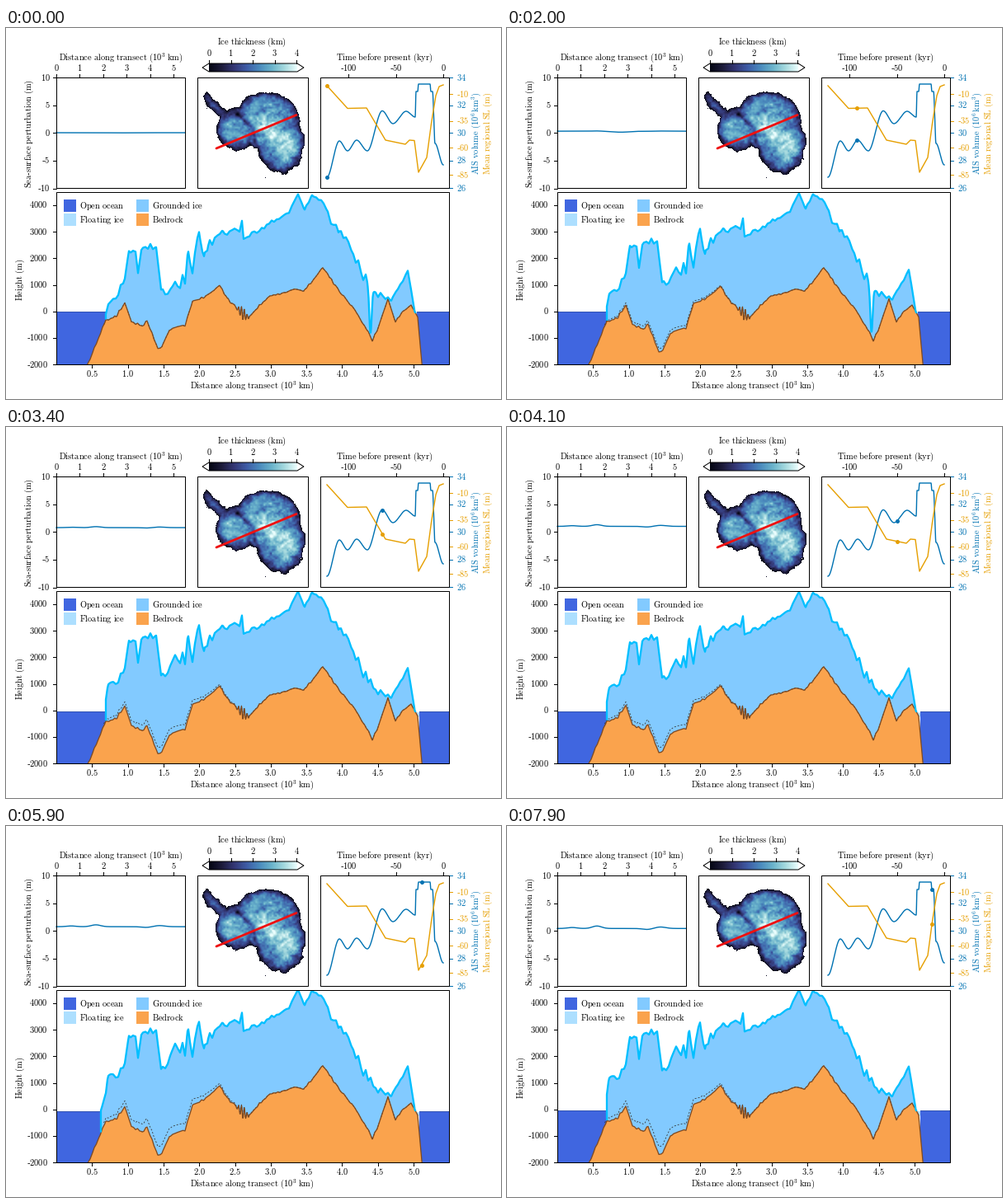
These frames come from a looping animation (600x450 px, 8 s). A matplotlib script:

```python
import numpy as np
import matplotlib.pyplot as plt
from matplotlib.animation import FuncAnimation
from matplotlib.colors import LinearSegmentedColormap
from matplotlib.patches import Rectangle

plt.rcParams.update({"mathtext.fontset": "cm", "font.family": "Liberation Serif"})

FRAMES, INTERVAL = 80, 100
PX = 0.72  # points per pixel
BLUE, ORANGE, INK = "#0072b2", "#e69f00", "black"
OCEAN, FLOATING, GROUNDED, ROCK = "#4066e0", "#addfff", "#82caff", "#faa34d"
ICE_EDGE, ROCK_EDGE = "#00bfff", "#7d4a22"
rng = np.random.default_rng(4)

# All coordinates are stage pixels, y pointing down.
fig = plt.figure(figsize=(6, 4.5), dpi=100, facecolor="white")
ax = fig.add_axes([0, 0, 1, 1])
ax.axis("off")


# ---------- helpers ----------
def tex(s):
    parts = [p.replace(" ", r"\ ") for p in s.split("-")]
    return "-".join(rf"$\mathrm{{{p}}}$" if p else "" for p in parts)


def label(x, y, s, ha="center", color=INK, rotation=0):
    va = "center" if rotation else "baseline"
    ax.text(x, y, tex(s), ha=ha, va=va, color=color, rotation=rotation,
            fontsize=7.5, zorder=9)


def line(x, y, color=INK, width=1.0, **kw):
    kw.setdefault("zorder", 6)
    return ax.plot(x, y, color=color, lw=width * PX, **kw)[0]


def frame(x0, y0, x1, y1):
    ax.add_patch(Rectangle((x0, y0), x1 - x0, y1 - y0, fill=False,
                           ec=INK, lw=PX, zorder=8))


def x_ticks(y, values, pos, up=True, fmt="{}"):
    for v in values:
        x = pos(v)
        line([x, x], [y, y - 4 if up else y + 4])
        label(x, y - 8.5 if up else y + 15, fmt.format(v))


def y_ticks(x, values, pos, gap, left=True, color=INK):
    side = -1 if left else 1
    for v in values:
        y = pos(v)
        line([x, x + 4 * side], [y, y], color)
        label(x + gap * side, y + 3.5, str(v), "right" if left else "left", color)


def bell(x, center, width):
    return np.exp(-((x - center) / width) ** 2)


def through(points, x):
    return np.interp(x, *np.transpose(points))


def ease_through(points, x):
    """Eased steps from one turning point to the next."""
    px, py = np.transpose(points)
    k = np.interp(x, px, np.arange(len(px)))
    u = k % 1
    return np.interp(k - u + u * u * (3 - 2 * u), np.arange(len(py)), py)


def jitter(x, step):
    knots = np.arange(x[0], x[-1] + step, step)
    return np.interp(x, knots, rng.normal(0, 1, len(knots)))


# ---------- axes ----------
time_x = lambda t: 530 + 1.15 * t
sl_y = lambda m: 67 - 1.307 * m
height_y = lambda h: 343.7 - 0.0322 * h

frame(61, 60, 217, 194)
x_ticks(60, range(6), lambda v: 61 + 28.45 * v)
y_ticks(61, range(-10, 11, 5), lambda v: 127.3 - 6.72 * v, 7.5)
label(139, 39, "Distance along transect (10^3 km)")
label(28, 128, "Sea-surface perturbation (m)", rotation=90)

frame(232, 60, 366, 194)

frame(381, 60, 537, 194)
x_ticks(60, (-100, -50, 0), time_x)
y_ticks(537, range(26, 35, 2), lambda v: 194.4 - 16.8 * (v - 26), 9, False, BLUE)
y_ticks(537, (-10, -35, -60, -85), sl_y, 9, False, ORANGE)
label(459, 39, "Time before present (kyr)")
label(570, 128, r"AIS volume (10^6\,km^3)", color=BLUE, rotation=90)
label(584, 128, "Mean regional SL (m)", color=ORANGE, rotation=90)

frame(61, 199, 537, 408)
x_ticks(408, np.arange(0.5, 5.1, 0.5), lambda v: 61 + 86.6 * v, False, "{:.1f}")
y_ticks(61, range(-2000, 4001, 1000), height_y, 10.5)
label(298, 437, "Distance along transect (10^3 km)")
label(17, 305, "Height (m)", rotation=90)

for x, y, color, name in ((70, 208, OCEAN, "Open ocean"),
                          (70, 225, FLOATING, "Floating ice"),
                          (158, 208, GROUNDED, "Grounded ice"),
                          (158, 225, ROCK, "Bedrock")):
    ax.add_patch(Rectangle((x, y), 15, 15, fc=color, ec="none", zorder=7))
    label(x + 19, y + 11, name, "left")

# ---------- colour bar ----------
ICE_MAP = LinearSegmentedColormap.from_list("ice", [
    "#040613", "#1c1b3a", "#343775", "#3e5ca6", "#4a8abd",
    "#6ab3cb", "#a5d9de", "#eafdfd"])
ax.imshow(np.linspace(0, 1, 214)[None], cmap=ICE_MAP, aspect="auto",
          extent=(246, 353, 53, 43), zorder=5)
ax.fill([246, 353, 361, 353, 246, 238], [43, 43, 48, 53, 53, 48],
        fill=False, ec=INK, lw=PX, zorder=6)
x_ticks(43, range(5), lambda v: 246 + 26.6 * v)
label(298, 20, "Ice thickness (km)")

# ---------- time series ----------
VOLUME = [(389, 181), (404, 137), (414, 149), (425, 136), (438, 149), (456, 100.5),
          (469, 116), (485, 101), (496, 108), (497, 77), (499, 77), (500, 68),
          (514, 68), (515, 77), (517, 77), (520, 140), (530, 166)]
SEA_LEVEL = [(389, 70), (414, 97.5), (437, 97), (460, 136), (484, 141), (489, 136),
             (495, 136.5), (500, 175), (510, 157), (515, 119), (521, 82), (525, 71),
             (530, 69)]
years = np.arange(389, 530.1, 0.25)
line(years, ease_through(VOLUME, years), BLUE, 1.4)
line(years, through(SEA_LEVEL, years), ORANGE, 1.4)
dot_style = dict(marker="o", ms=5 * PX, mew=0, zorder=7)
vol_dot = line([0], [0], BLUE, **dot_style)
sl_dot = line([0], [0], ORANGE, **dot_style)

# ---------- sea-surface perturbation ----------
wave_x = np.arange(61, 218)
wave = line(wave_x, wave_x * 0, BLUE, 1.4)
ripple = (bell(wave_x, 109, 8) + 0.6 * bell(wave_x, 186, 9)
          - 0.4 * bell(wave_x, 170, 8) + 0.4 * bell(wave_x, 79, 8))
trough = bell(wave_x, 138, 15)


def wave_y(i):
    level = through([(0, 0.3), (13, 0.6), (27, 3.7), (41, 6.8), (52, 4.6),
                     (68, 5.9), (79, 3)], i)
    swing = through([(0, 0), (27, 0.4), (41, 2), (52, 1.2), (68, 3.6), (79, 3)], i)
    sag = 2.6 * bell(i, 13, 8)
    return 127.3 - level - swing * ripple + sag * trough


# ---------- transect ----------
BED = [(97, 412), (110, 382), (121, 354), (133, 350), (144, 334), (152, 356),
       (165, 362), (171, 356), (184, 388), (189, 387), (198, 366), (217, 360),
       (226, 332), (241, 326), (259, 312), (268, 328), (294, 353), (304, 339),
       (320, 326), (352, 316), (361, 319), (372, 306), (384, 290), (396, 308),
       (424, 343), (444, 379), (450, 366), (463, 329), (472, 356), (481, 344),
       (491, 336), (499, 351), (504.5, 412)]
ICE = [(115, 345), (121, 345), (124, 333), (136, 322), (144, 303), (149, 270),
       (154, 270), (160, 292), (164, 267), (182, 267), (188, 321), (217, 305),
       (221, 278), (226, 296), (234, 249), (240, 277), (245, 262), (263, 244),
       (283, 247), (286, 234), (288, 256), (307, 245), (343, 223), (354, 201),
       (362, 219), (371, 203), (382, 208), (390, 222), (394, 238), (404, 242),
       (434, 300), (446, 318), (467, 331), (487, 293), (496, 348)]

xs = np.arange(97, 505, 0.5)
crevasses = 8 * np.sin(1.8 * xs) * bell(xs, 287, 5)
bed0 = through(BED, xs) + 0.8 * jitter(xs, 2.5) + crevasses
taper = np.clip((xs - 115) / 8, 0, 1) * np.clip((496 - xs) / 8, 0, 1)
rugged = 1 + 3.5 * bell(xs, 205, 75) + 4 * bell(xs, 430, 25)
ice0 = through(ICE, xs) + taper * rugged * jitter(xs, 3)
dip = 62 * bell(xs, 441.8, 2)
growth = taper * (3 + 13 / (1 + np.exp((xs - 232) / 6)) + 16 * bell(xs, 124, 10)
                  + 28 * bell(xs, 206, 15) + 5 * bell(xs, 275, 30))
sink = 10.5 * bell(xs, 185, 65)

box = Rectangle((61, 199), 476, 209, transform=ax.transData)


def region(color, z):
    patch = ax.fill([0, 1, 1], [0, 0, 1], fc=color, ec="none", zorder=z)[0]
    patch.set_clip_path(box)
    return patch


def outline(color, width, z):
    curve = line([], [], color, width, zorder=z, solid_joinstyle="round")
    curve.set_clip_path(box)
    return curve


sea_left, sea_right = region(OCEAN, 1), region(OCEAN, 1)
shelf, ice_fill, rock = region(FLOATING, 1.5), region(GROUNDED, 2), region(ROCK, 3)
shores = [outline("#2f4fa8", 0.8, 2) for _ in range(2)]
rock_line, ice_line = outline(ROCK_EDGE, 1.3, 4), outline(ICE_EDGE, 2.3, 5)
mid = (xs > 118) & (xs < 497)
line(xs[mid], bed0[mid], "#333333", 0.8, zorder=3.5, dashes=(2.5, 2.5))

# ---------- ice thickness map ----------
N = 134
gx, gy = np.meshgrid(np.arange(N) + 232.5, np.arange(N) + 60.5)


def ellipse(x, y, rx, ry):
    return (1 - np.hypot((gx - x) / rx, (gy - y) / ry)) * min(rx, ry)


def strip(x0, y0, x1, y1, half):
    dx, dy = x1 - x0, y1 - y0
    u = np.clip(((gx - x0) * dx + (gy - y0) * dy) / (dx * dx + dy * dy), 0, 1)
    return half - np.hypot(gx - x0 - u * dx, gy - y0 - u * dy)


def noise(n):
    g = rng.normal(0, 1, (n, n))
    k, u = np.linspace(0, 1, n), np.linspace(0, 1, N)
    g = np.array([np.interp(u, k, r) for r in g])
    return np.array([np.interp(u, k, c) for c in g.T]).T


def spot(x, y, rx, ry):
    return bell(gx, x, rx) * bell(gy, y, ry)


land = [ellipse(316, 113, 40, 35), ellipse(333, 140, 29, 36),
        ellipse(281, 122, 26, 26), strip(244, 83, 249, 92, 4.5),
        strip(249, 92, 266, 106, 6)]
depth = np.max(land, axis=0) + 0.6 * noise(67) + 0.9 * noise(24)
ridge = np.maximum(strip(281, 104, 299, 122, 0), strip(299, 122, 306, 150, 0))
thick = (2 + 1.1 * spot(320, 115, 30, 34) + 1.2 * spot(338, 147, 14, 16)
         + 0.8 * spot(272, 124, 10, 12) - 1.2 * bell(ridge, 0, 3)
         - 0.8 * spot(268, 101, 14, 6) + 0.35 * noise(16) + 0.35 * noise(34)
         + 0.25 * noise(67))
west = spot(270, 115, 22, 28)
ice_map = ax.imshow(np.zeros((N, N)), cmap=ICE_MAP, vmin=0, vmax=4, aspect="auto",
                    extent=(232, 366, 194, 60), interpolation="nearest", zorder=2)
for x, y in ((314, 181), (243, 97)):
    ax.add_patch(Rectangle((x, y), 1.3, 1.3, fc="#0c0d24", ec="none", zorder=3))
line([255, 352], [146, 105.5], "#ee1111", 2.8, zorder=5, solid_capstyle="round")

ax.set_xlim(0, 600)
ax.set_ylim(450, 0)


# ---------- animation ----------
def update(i):
    t = through([(0, -122.5), (10, -112), (50, -32), (61, -21), (68, -17.4),
                 (79, -13)], i)
    x = time_x(t)
    vol, sl = ease_through(VOLUME, x), through(SEA_LEVEL, x)
    vol_dot.set_data([x], [vol])
    sl_dot.set_data([x], [sl])
    wave.set_data(wave_x, wave_y(i))

    w = np.clip((181 - vol) / 113, 0, 1)
    sea = height_y((67 - sl) / 1.307)
    coast = 121 - 6 * np.clip((w - 0.94) / 0.06, 0, 1)
    fill = np.clip((w - 0.42) / 0.12, 0, 1)

    bed = bed0 + sink * w
    top = np.minimum(ice0 - growth * w + dip * (1 - fill), bed)
    on = (xs >= coast) & (xs <= 496)
    xi = xs[on]
    rock.set_xy(np.r_[np.c_[xs, bed], [(505, 415), (97, 415)]])
    rock_line.set_data(xs, bed)
    ice_fill.set_xy(np.r_[np.c_[xi, top[on]], np.c_[xi, bed[on]][::-1]])
    ice_line.set_data(np.r_[xi[0], xi], np.r_[bed[on][0] - 2, top[on]])

    edge = 498 + 3 * fill
    for patch, shore, a, b in ((sea_left, shores[0], 61, coast),
                               (sea_right, shores[1], edge, 538)):
        patch.set_xy([(a, sea), (b, sea), (b, 408), (a, 408)])
        shore.set_data([a, b], [sea, sea])
    shelf.set_xy([(493, sea + 1), (edge, sea + 1), (edge, 351), (497, 354)])

    d = depth + 1.3 * w
    h = (thick + 0.35 * w * west) * (1 - np.exp(-np.maximum(d, 0) / 4.5))
    ice_map.set_data(np.ma.masked_where(d <= 0, h))
    return []


anim = FuncAnimation(fig, update, frames=FRAMES, interval=INTERVAL,
                     repeat=True, repeat_delay=0, blit=False)
plt.show()
```
